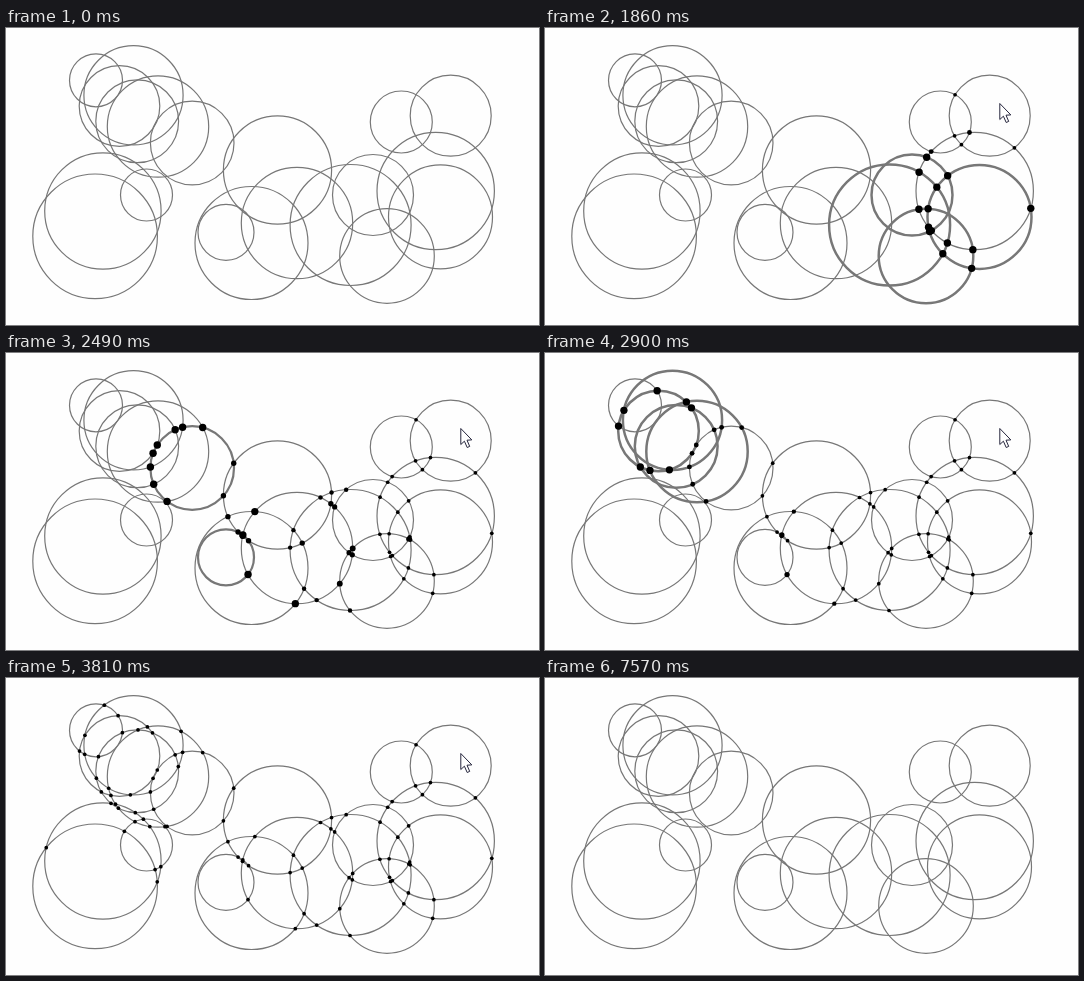
An HTML page with a canvas for the animation above (8.12 s loop, 533x297 px).

```html
<!DOCTYPE html>
<html lang="en">
<head>
<meta charset="utf-8">
<title>Touching circles</title>
<style>
html, body { margin: 0; width: 100%; height: 100%; overflow: hidden; background: #fefefe; }
canvas { display: block; width: 533px; height: 297px; }
</style>
</head>
<body>
<canvas id="stage"></canvas>
<script>
const W = 533, H = 297, LOOP = 8120;
const ENTER = 830, CLICK = 950, LEAVE = 7510, RESET = 7570;
const STEP = 344, SPREAD = 400, LAST = 3010;
const THIN = 1.2, BOLD = 2.5;
const canvas = document.getElementById('stage');
const ctx = canvas.getContext('2d');
const dpr = window.devicePixelRatio || 1;
canvas.width = W * dpr;
canvas.height = H * dpr;

const clamp = v => Math.max(0, Math.min(1, v));
const smooth = v => v * v * (3 - 2 * v);
const mix = (a, b, k) => a + (b - a) * k;

// x, y, radius; the first one is clicked
const circles = [
  [444.7, 87.7, 40.5], [395.3, 94, 31], [429.7, 163, 58.7], [434.5, 188.9, 52],
  [344.6, 197, 60.5], [367, 167, 40.5], [381, 228, 47.3], [271.5, 142, 54.1],
  [245.5, 215, 56.5], [291, 195, 55.7], [186.2, 115, 41.8], [113.5, 78, 40.3],
  [127.5, 67.3, 49.6], [131.2, 93.3, 41.4], [152, 98.5, 50.7], [90, 52.3, 26.5],
  [96.9, 183, 58.2], [140.5, 167, 26], [89.1, 208.3, 62.3], [220, 204.3, 28]
].map(([x, y, r]) => ({ x, y, r }));

function crossings(a, b) {
  const dx = b.x - a.x, dy = b.y - a.y, d = Math.hypot(dx, dy);
  if (d >= a.r + b.r || d <= Math.abs(a.r - b.r)) return [];
  const m = (d * d + a.r * a.r - b.r * b.r) / (2 * d);
  const h = Math.sqrt(a.r * a.r - m * m);
  return [-1, 1].map(s => ({
    x: a.x + (dx * m - s * dy * h) / d,
    y: a.y + (dy * m + s * dx * h) / d
  }));
}

// spread from the clicked circle, one generation of neighbours at a time
let wave = [circles[0]];
for (let step = 0; wave.length; step++) {
  wave.forEach((c, i) => {
    const lag = SPREAD * Math.sqrt(i / Math.max(1, wave.length - 1));
    c.start = CLICK + 50 + step * STEP;
    c.lit = Math.min(LAST, CLICK + step * STEP + lag);
  });
  wave = circles.filter(c => c.start === undefined && wave.some(p => crossings(p, c).length));
}

const dots = circles.flatMap((a, i) => circles.slice(i + 1).flatMap(b =>
  crossings(a, b).map(p => ({ ...p, born: Math.min(a.lit, b.lit) }))));

function dotRadius(age) {
  return age < 100 ? 3.7 * clamp(age / 100) : mix(3.7, 1.85, smooth(clamp((age - 180) / 620)));
}

function trace(x, y, r) {
  ctx.beginPath();
  ctx.arc(x, y, r, 0, Math.PI * 2);
}

function ring(c, t) {
  let r = c.r, width = THIN;
  if (c.start === undefined) {
    // a circle that was never reached swells and fades
    const k = clamp((t - CLICK) / 400);
    r = mix(r, 38.5, k);
    ctx.globalAlpha = 1 - k;
  } else {
    width = mix(THIN, BOLD, Math.sin(Math.PI * clamp((t - c.start) / 400)));
  }
  trace(c.x, c.y, r);
  ctx.lineWidth = width;
  ctx.stroke();
  ctx.globalAlpha = 1;
}

function cursor(x, y) {
  ctx.beginPath();
  [[0, 0], [0, 16], [3.6, 12.7], [6.4, 19], [8.9, 17.9], [6.2, 11.7], [11, 11.4]]
    .forEach(([px, py]) => ctx.lineTo(x + px, y + py));
  ctx.closePath();
  ctx.fillStyle = '#fff';
  ctx.fill();
  ctx.lineWidth = 1;
  ctx.strokeStyle = '#25253c';
  ctx.stroke();
}

function draw(t) {
  const active = t >= ENTER && t < RESET;
  ctx.setTransform(dpr, 0, 0, dpr, 0, 0);
  ctx.fillStyle = '#fefefe';
  ctx.fillRect(0, 0, W, H);
  ctx.strokeStyle = '#777';
  for (const c of circles) ring(c, active ? t : 0);
  if (!active) return;

  ctx.fillStyle = '#000';
  for (const p of dots) {
    trace(p.x, p.y, dotRadius(t - p.born));
    ctx.fill();
  }
  if (t >= LEAVE) cursor(465.5, 77.5);
  else {
    const k = smooth(clamp((t - ENTER) / (CLICK - ENTER)));
    cursor(mix(530, 454.8, k), mix(92, 75.5, k));
  }
}

const begin = performance.now();
function tick() {
  draw((performance.now() - begin) % LOOP);
  requestAnimationFrame(tick);
}
tick();
</script>
</body>
</html>
```
